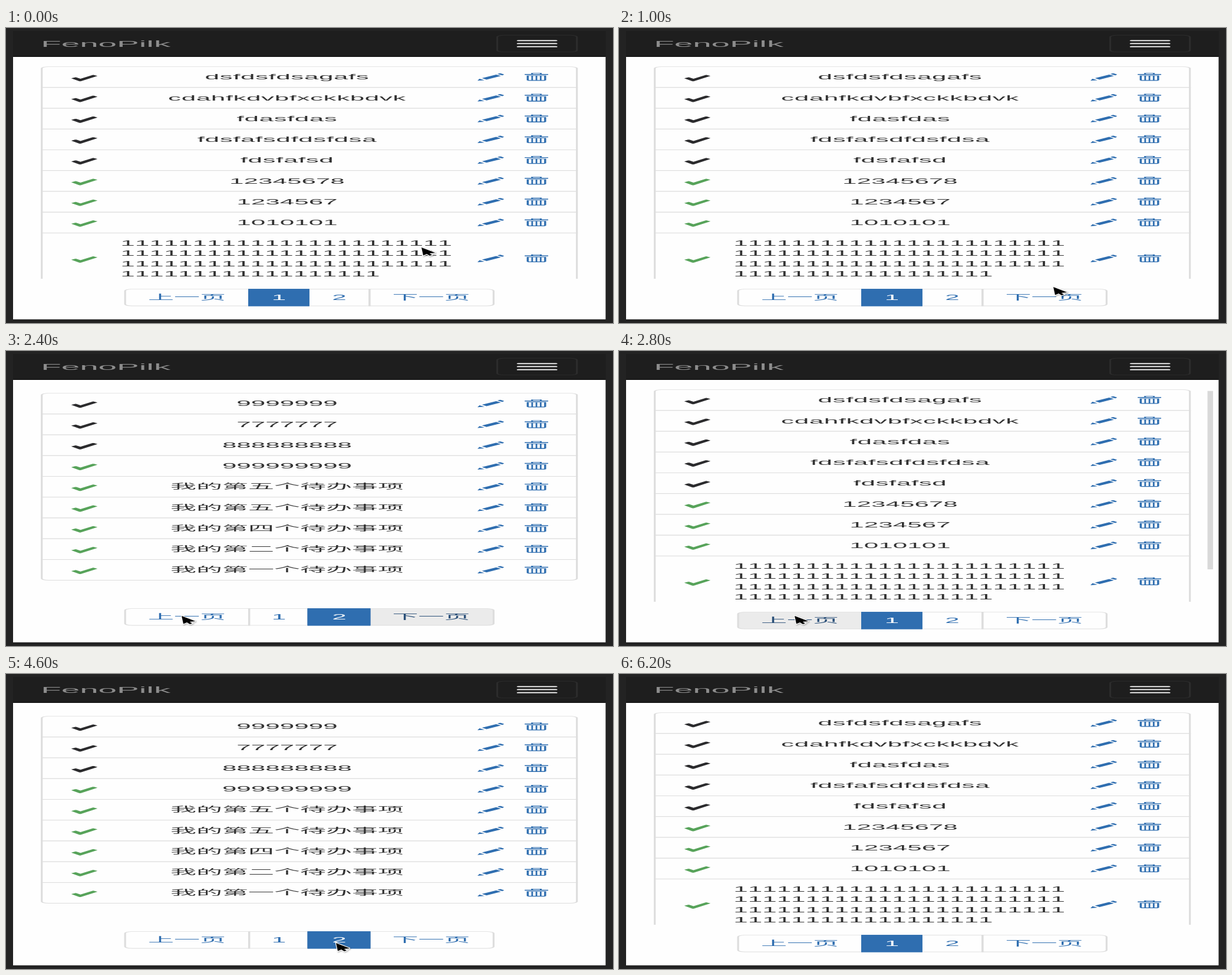
These frames come from a looping animation (1030x500 px, 6.3 s). An HTML page:

```html
<!DOCTYPE html>
<html lang="zh-CN">
<head>
<meta charset="utf-8">
<style>
html, body { margin: 0; width: 1030px; height: 500px; overflow: hidden; background: #232323; }
body { position: relative; }
ul { list-style: none; margin: 0; padding: 0; }
/* a 320 x 568 phone page, shown widened */
#phone {
  position: absolute; left: 12.3px; top: 5px; width: 320px; height: 568.5px;
  transform: scale(3.142, .859); transform-origin: 0 0; overflow: hidden;
  background: linear-gradient(#1e1e1e 51px, #fefefe 0); color: #333;
  font: 14px/20px "Liberation Sans", "Noto Sans CJK SC", Arial, sans-serif;
  font-kerning: none;
}
#phone *, #cursor { box-sizing: border-box; }
nav { position: absolute; width: 320px; height: 51px; background: #1e1e1e; border-bottom: 1px solid #080808; }
.brand { position: absolute; left: 15px; top: 15px; font-size: 18px; color: #8c8c8c; }
.toggle { position: absolute; left: 261px; top: 8px; width: 44px; height: 34px; padding: 9px 10px; border: 1px solid #2c2c2c; border-radius: 4px; }
.toggle i { display: block; height: 2px; margin-bottom: 4px; border-radius: 1px; background: #fff; }
#view { position: absolute; top: 51px; width: 320px; height: 438px; overflow: hidden; }
.list { position: absolute; left: 15px; width: 290px; }
.list li {
  position: relative; margin-top: -1px; padding: 10px 66px 10px 42px; border: 1px solid #ddd;
  white-space: pre; text-align: center;
}
.list li:first-child { margin-top: 0; border-radius: 4px 4px 0 0; }
.list li:last-child { border-radius: 0 0 4px 4px; }
.list .long { text-align: left; }
.list .word { letter-spacing: .18px; }
.list svg { position: absolute; left: -16px; top: calc(50% - 20.5px); width: 320px; height: 42px; color: #2b2b2d; }
.list .done svg { color: #57a35a; }
#pager { position: absolute; left: 60px; display: flex; color: #2f6eb0; }
#pager li { position: relative; margin-left: -1px; padding: 6px 11.9px; border: 1px solid #ddd; white-space: nowrap; }
#pager li:first-child { margin-left: 0; border-radius: 4px 0 0 4px; }
#pager li:last-child { border-radius: 0 4px 4px 0; }
#pager .hover { background: #ebebeb; color: #2a4f78; }
#pager .active { z-index: 1; background: #2f6eb0; border-color: #2f6eb0; color: #fff; }
#bar { position: absolute; left: 313.9px; top: 73.3px; width: 3.2px; height: 351.6px; background: #d9d9d9; }
#cursor { position: absolute; left: 0; top: 0; overflow: visible; filter: drop-shadow(1px 1px 1px #0005); }
[hidden] { display: none !important; }
</style>
</head>
<body>
<svg width="0" height="0" style="position:absolute">
  <symbol id="icons" viewBox="0 0 320 42">
    <path fill="currentColor" d="M31.4 22.5L33.4 20.6Q33.8 20.2 34.2 20.6L36.4 23.2L42.9 15.9Q43.3 15.5 43.7 15.9L45.6 17.7L36.8 28Q36.2 28.6 35.6 28Z"/>
    <g fill="#2f6eb0">
      <path d="M250.8 27.2L251.9 23.4L254.6 26.2ZM253.2 22.2L260.9 15.1L263.5 17.8L255.7 25ZM261.5 14L262.6 12.8Q263 12.4 263.5 12.8L265 14.6Q265.3 15 265 15.4L264.2 16.6Z"/>
      <path fill="none" stroke="#2f6eb0" d="M280.3 14.5V12.4H285V14.5"/>
      <path d="M276.3 14h12.7v1.7h-12.7z"/>
      <path fill-rule="evenodd" d="M277.4 16.9H287.9V26.2L287 27.3H278.3L277.4 26.2ZM278.5 17.8v8h1.4v-8zM280.8 17.8v8h1.4v-8zM283.1 17.8v8h1.4v-8zM285.4 17.8v8h1.4v-8z"/>
    </g>
  </symbol>
</svg>
<div id="phone">
  <nav><span class="brand">FenoPilk</span><div class="toggle"><i></i><i></i><i></i></div></nav>
  <div id="view"></div>
  <ul id="pager"><li>上一页</li><li>1</li><li>2</li><li>下一页</li></ul>
  <div id="bar"></div>
</div>
<svg id="cursor" width="28" height="18">
  <path d="M0 1L3 14.5L9 12L14 15L18 13.5L13.5 11L23.5 10Z" stroke="#fff" stroke-width="2.4" paint-order="stroke"/>
</svg>
<script>
const LOOP = 6300, STEP = 100;
const $ = id => document.getElementById(id);
const ones = n => '1'.repeat(n);
const nth = c => `我的第${c}个待办事项`;

const pages = [
  { top: 19, pager: 509, open: 5, items: ['dsfdsfdsagafs', 'cdahfkdvbfxckkbdvk', 'fdasfdas', 'fdsfafsdfdsfdsa', 'fdsfafsd',
    '12345678', '1234567', '1010101', [23, 23, 23, 18].map(ones).join('\n')] },
  { top: 26, pager: 502, open: 3, items: ['9999999', '7777777', '888888888', '999999999', ...[...'五五四二一'].map(nth)] }
];

for (const p of pages) {
  p.el = document.createElement('ul');
  p.el.className = 'list';
  p.el.style.top = p.top + 'px';
  p.el.innerHTML = p.items.map((text, i) => {
    const kind = [i >= p.open && 'done', text.includes('\n') && 'long', /[a-z]/.test(text) && 'word'];
    return `<li class="${kind.filter(Boolean).join(' ')}">${text}<svg><use href="#icons"/></svg></li>`;
  }).join('');
  $('view').append(p.el);
}

// pointer path: time, x, y
const path = [
  [0, 705, 371], [600, 737, 438], [1100, 737, 438], [1400, 738, 453], [1700, 738, 453],
  [2400, 298, 448], [3200, 298, 448], [3900, 494, 456], [4100, 494, 456], [4400, 560, 455],
  [4700, 560, 455], [5100, 486, 449], [LOOP, 486, 449]
];

function pointer(t) {
  const i = path.findIndex(k => k[0] > t);
  const [t0, x0, y0] = path[i - 1], [t1, x1, y1] = path[i];
  const u = (t - t0) / (t1 - t0), e = u * u * (3 - 2 * u);
  return [x0 + (x1 - x0) * e, y0 + (y1 - y0) * e];
}

const within = (t, a, b) => t >= a && t < b;

function draw(now) {
  const t = Math.floor(now % LOOP / STEP) * STEP;
  const page = within(t, 1500, 2700) || within(t, 4500, 5400) ? 1 : 0;
  const hover = within(t, 1500, 2700) ? 3 : within(t, 2700, 4500) ? 0 : -1;

  pages.forEach((p, i) => p.el.hidden = i !== page);
  $('pager').style.top = pages[page].pager + 'px';
  [...$('pager').children].forEach((li, i) => {
    li.className = i === page + 1 ? 'active' : i === hover ? 'hover' : '';
  });
  $('bar').hidden = !(within(t, 2700, 3000) || within(t, 5400, 5600));

  const [x, y] = pointer(t);
  $('cursor').style.transform = `translate(${x}px, ${y}px)`;
  $('cursor').style.display = t < 5900 ? '' : 'none';
}

const start = performance.now();
(function tick() {
  draw(performance.now() - start);
  requestAnimationFrame(tick);
})();
</script>
</body>
</html>
```
